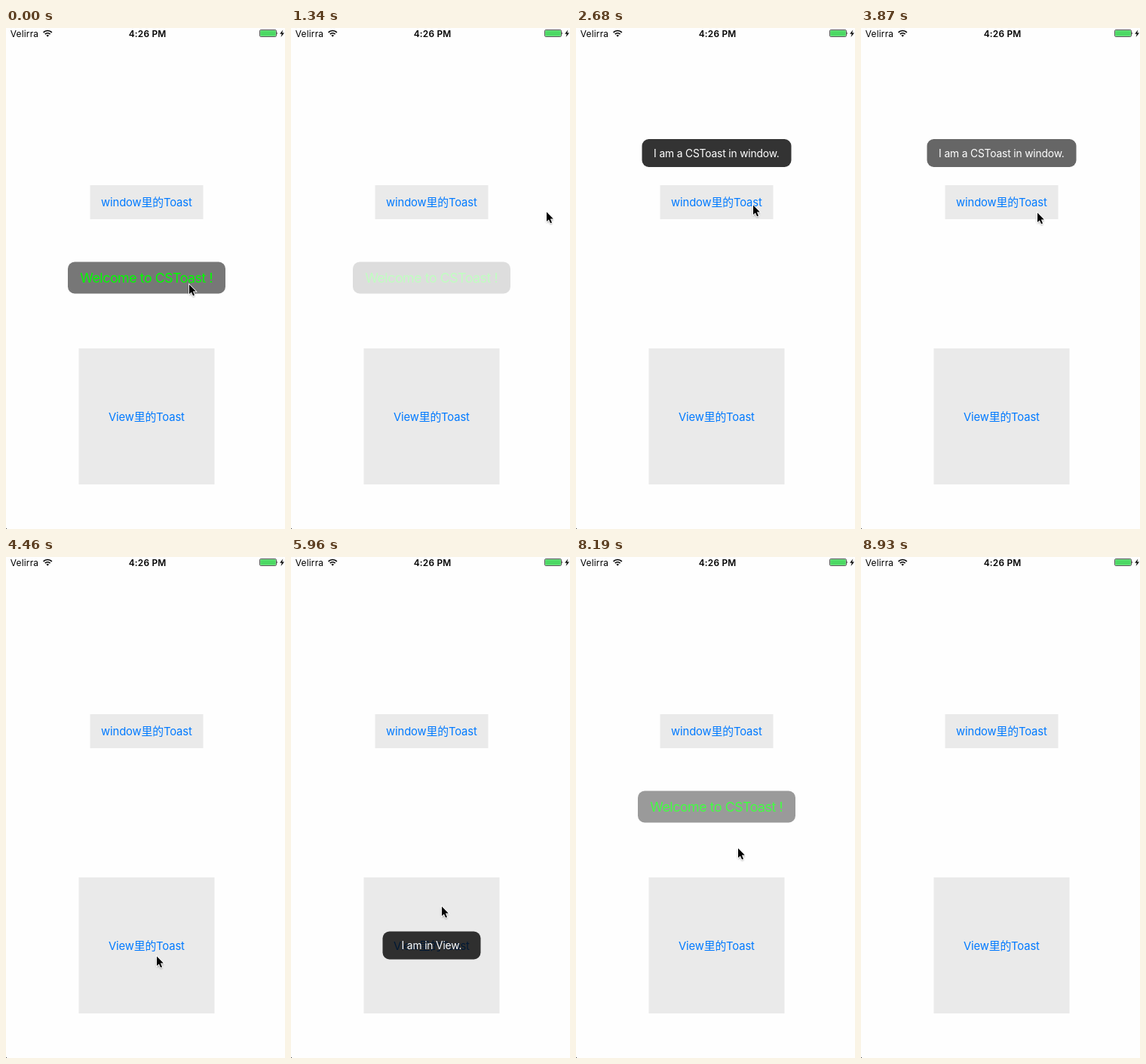
Recreate the animation shown at these times as an HTML page. Size 370 px wide and 663 px high, loop 9570 ms.

```html
<!DOCTYPE html>
<html lang="en">
<head>
<meta charset="utf-8">
<title>Toast demo</title>
<style>
html, body { margin: 0; width: 100%; height: 100%; overflow: hidden; background: #fefefe; }
svg { display: block; width: 100%; height: 100%; }
text {
  font-family: Inter, "Noto Sans CJK SC", "Noto Sans CJK", sans-serif;
  text-anchor: middle;
}
.status { font-size: 11.9px; letter-spacing: .2px; }
.button { font-size: 14.8px; letter-spacing: -.12px; fill: #007aff; }
.note { font-size: 13.8px; letter-spacing: -.15px; fill: #fff; }
.hello { font-size: 17.8px; letter-spacing: -.45px; fill: #0f0; }

/* The screen refreshes about every 150 ms, so motion is stepped. */
.move { animation: 9570ms step-end infinite; }
#welcome { animation-name: welcome; }
#inWindow { animation-name: in-window; }
#inView { animation-name: in-view; }
#press { animation-name: press; }
#pointer { animation-name: pointer; }

@keyframes welcome {
  0% { opacity: 1; }
  9.4% { opacity: .93; }
  10.97% { opacity: .75; }
  12.53% { opacity: .5; }
  14% { opacity: .24; }
  15.56% { opacity: .07; }
  17.13% { opacity: 0; }
  73.14% { opacity: .36; }
  74.71% { opacity: 1; }
  84.01% { opacity: .93; }
  85.58% { opacity: .74; }
  87.14% { opacity: .48; }
  88.71% { opacity: .23; }
  90.17% { opacity: .06; }
  91.74%, 100% { opacity: 0; }
}
@keyframes in-window {
  0% { opacity: 0; }
  26.43% { opacity: .4; }
  28% { opacity: 1; }
  37.4% { opacity: .94; }
  38.97% { opacity: .75; }
  40.54% { opacity: .48; }
  42% { opacity: .24; }
  43.57% { opacity: .06; }
  45.14%, 100% { opacity: 0; }
}
@keyframes in-view {
  0% { opacity: 0; }
  49.73% { opacity: .4; }
  51.3% { opacity: 1; }
  63.84% { opacity: .76; }
  65.3% { opacity: .48; }
  66.87% { opacity: .18; }
  68.44%, 100% { opacity: 0; }
}
@keyframes press {
  0% { opacity: 1; }
  24.86% { opacity: .3; }
  26.43% { opacity: .75; }
  28%, 100% { opacity: 1; }
}
@keyframes pointer {
  0% { transform: translate(242px, 338px); }
  10.97% { transform: translate(264px, 317px); }
  12.53% { transform: translate(316px, 265px); }
  14% { transform: translate(338px, 242px); }
  15.56% { transform: translate(325px, 239px); }
  17.13% { transform: translate(281px, 236px); }
  18.7% { transform: translate(246px, 235px); }
  20.27% { transform: translate(234px, 234px); }
  21.83% { transform: translate(234px, 233px); }
  38.97% { transform: translate(233px, 243px); }
  40.54% { transform: translate(228px, 289px); }
  42% { transform: translate(218px, 372px); }
  43.57% { transform: translate(208px, 457px); }
  45.14% { transform: translate(201px, 512px); }
  46.6% { transform: translate(199px, 527px); }
  62.27% { transform: translate(199px, 461px); }
  63.84% { transform: translate(203px, 415px); }
  65.3% { transform: translate(206px, 387px); }
  66.87% { transform: translate(208px, 372px); }
  68.44% { transform: translate(208px, 367px); }
  85.58% { transform: translate(214px, 384px); }
  87.14% { transform: translate(237px, 440px); }
  88.71% { transform: translate(267px, 520px); }
  90.17% { transform: translate(296px, 596px); }
  91.74% { transform: translate(319px, 650px); }
  93.31%, 100% { transform: translate(380px, 700px); }
}
</style>
</head>
<body>
<svg viewBox="0 0 370 663" preserveAspectRatio="none">
  <defs>
    <filter id="soft" x="-50%" y="-50%" width="200%" height="200%">
      <feGaussianBlur stdDeviation="1"/>
    </filter>
    <path id="arrow" d="M1 1.6V14.1L3.9 11.4 6.1 16.2 8 15.4 5.9 10.6H9.8Z"/>
  </defs>
  <rect width="370" height="663" fill="#fefefe"/>

  <g class="status">
    <text x="24.5" y="11.5">Velirra</text>
    <text x="187.6" y="11.5" font-weight="600">4:26 PM</text>
    <g fill="none" stroke="#000" stroke-width="1.7">
      <path d="M49.6 5.9A7.7 7.7 0 0 1 60.8 5.9"/>
      <path d="M51.8 8.2A4.7 4.7 0 0 1 58.6 8.2"/>
    </g>
    <path d="M55.2 11.8L53.4 9.8A2.6 2.6 0 0 1 57 9.8Z"/>
    <rect x="336.5" y="2.5" width="22" height="9" rx="1.6" fill="none" stroke="#444" stroke-width=".9"/>
    <rect x="337.2" y="3.2" width="20.6" height="7.6" rx=".7" fill="#4cd964"/>
    <path d="M359.4 5.3Q361 7 359.4 8.7Z" fill="#222"/>
    <path d="M367.2 2.5L363.2 7.7H365.8L364.6 12 369 6.4H366.2Z"/>
  </g>
  <rect y="662" width="1" height="1" fill="#444"/>

  <rect x="111.5" y="208" width="150" height="45" fill="#eaeaea"/>
  <text id="press" class="button move" x="186.4" y="236">window里的Toast</text>
  <rect x="96.5" y="424" width="180" height="180" fill="#eaeaea"/>
  <text class="button" x="186.4" y="519.5">View里的Toast</text>

  <g id="inView" class="move">
    <rect x="121.5" y="495.5" width="130" height="37" rx="9" fill-opacity=".8"/>
    <text class="note" x="186.4" y="519">I am in View.</text>
  </g>
  <g id="welcome" class="move">
    <rect x="82" y="309.5" width="209" height="42" rx="9" fill="#777"/>
    <text class="hello" x="186.2" y="337">Welcome to CSToast !</text>
  </g>
  <g id="inWindow" class="move">
    <rect x="87.5" y="147" width="198" height="37" rx="9" fill-opacity=".8"/>
    <text class="note" x="186.4" y="171">I am a CSToast in window.</text>
  </g>

  <g id="pointer" class="move">
    <use href="#arrow" y="1.4" stroke="#000" opacity=".4" filter="url(#soft)"/>
    <use href="#arrow" stroke="#fff" stroke-width="1.8" paint-order="stroke"/>
  </g>
</svg>
</body>
</html>
```
